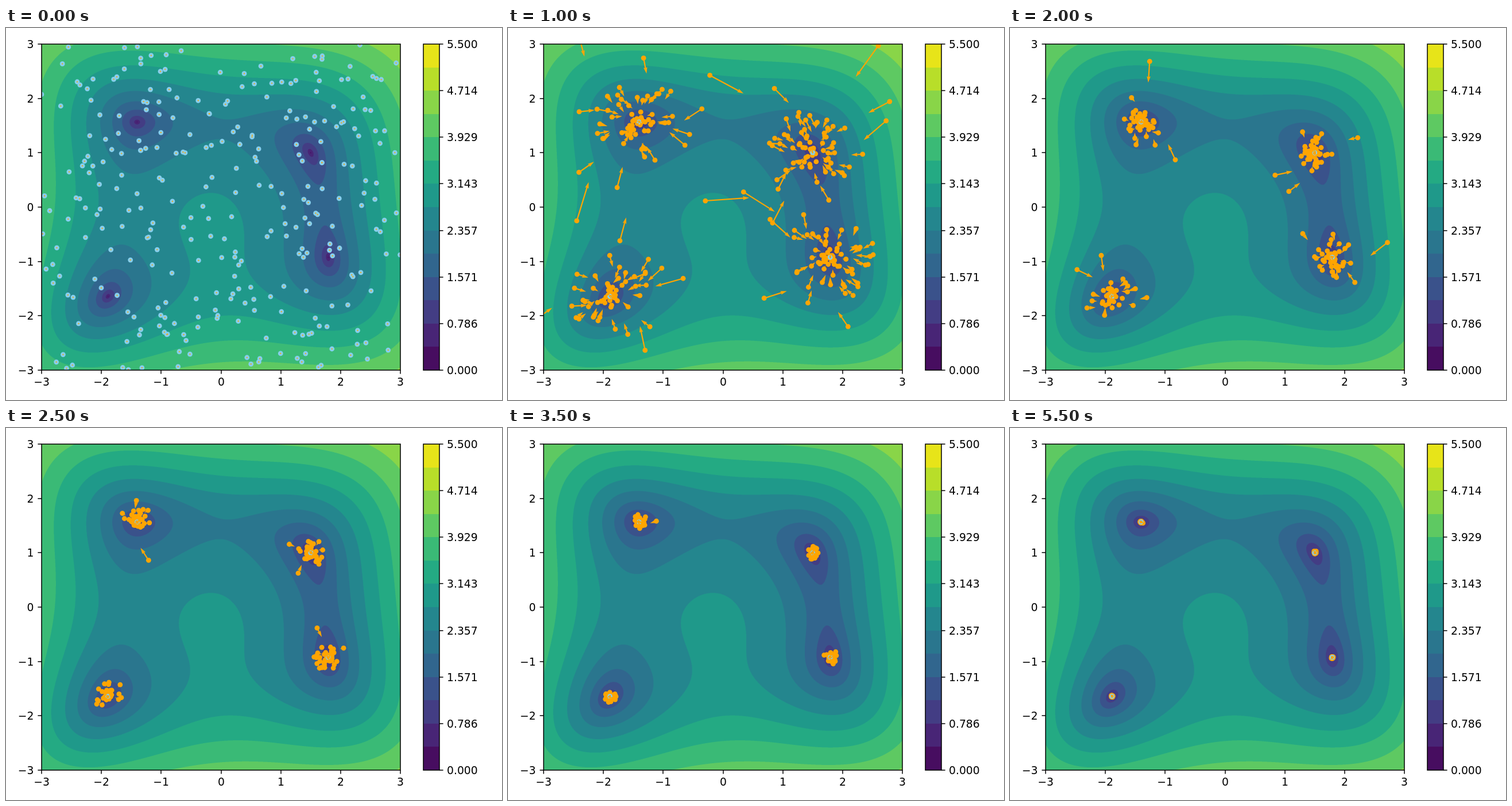
These frames come from a looping animation (864 px wide and 648 px high, 6 s). An HTML page with a canvas:

```html
<!DOCTYPE html>
<html lang="en">
<head>
<meta charset="utf-8">
<title>Particle swarm on a contour map</title>
<style>
  html, body { margin: 0; width: 100%; height: 100%; overflow: hidden; background: #fff; }
  canvas { display: block; width: 864px; height: 648px; }
</style>
</head>
<body>
<canvas id="stage" width="864" height="648"></canvas>
<script>
const ctx = document.getElementById('stage').getContext('2d');
const STEP = 500, STEPS = 12, COUNT = 300, LEVELS = 14, TOP = 5.5;
const LEFT = 62, RIGHT = 687, UPPER = 28, LOWER = 596;
const BAR_LEFT = 727, BAR_RIGHT = 755;
const X0 = 374.5, Y0 = 312, SX = 104.2, SY = 94.67;
const ORANGE = '#ffa500', SKY = '#87ceeb';
const BANDS = [
  '#470d60', '#482576', '#433d84', '#3a528b', '#31668e', '#2a768e', '#24868e',
  '#1f998a', '#24aa83', '#3aba76', '#5ec962', '#89d548', '#b8de29', '#e7e419'];

const px = x => X0 + SX * x;
const py = y => Y0 - SY * y;

// Fifth root of Himmelblau's function on doubled coordinates, at a pixel
function height(u, v) {
  const x = 2 * (u - X0) / SX, y = 2 * (Y0 - v) / SY;
  const a = x * x + y - 11, b = x + y * y - 7;
  return Math.pow(a * a + b * b, 0.2);
}

const homes = [[-1.403, 1.566], [1.5, 1], [1.792, -0.924], [-1.89, -1.642]]
  .map(([x, y]) => ({ x: px(x), y: py(y) }));

function random(seed) {
  return () => {
    seed = seed + 0x6D2B79F5 | 0;
    let t = Math.imul(seed ^ seed >>> 15, 1 | seed);
    t = t + Math.imul(t ^ t >>> 7, 61 | t) ^ t;
    return ((t ^ t >>> 14) >>> 0) / 4294967296;
  };
}

function paintField(c) {
  const w = RIGHT - LEFT, h = LOWER - UPPER, n = 3;
  const img = c.createImageData(w, h);
  const rgb = BANDS.map(s => [1, 3, 5].map(i => parseInt(s.slice(i, i + 2), 16)));
  for (let j = 0; j < h; j++) for (let i = 0; i < w; i++) {
    const sum = [0, 0, 0];
    for (let s = 0; s < n * n; s++) {
      const f = height(LEFT + i + (s % n + 0.5) / n, UPPER + j + (Math.floor(s / n) + 0.5) / n);
      const color = rgb[Math.min(LEVELS - 1, Math.floor(f / TOP * LEVELS))];
      for (let q = 0; q < 3; q++) sum[q] += color[q] / (n * n);
    }
    img.data.set([...sum, 255], (j * w + i) * 4);
  }
  c.putImageData(img, LEFT, UPPER);
}

function line(c, x1, y1, x2, y2) {
  c.beginPath();
  c.moveTo(x1, y1);
  c.lineTo(x2, y2);
  c.stroke();
}

function label(c, text, x, y, align) {
  c.textAlign = align;
  c.fillText(text, x, Math.round(y + 6.8));
}

function paintAxes(c) {
  const band = (LOWER - UPPER) / LEVELS;
  BANDS.forEach((color, i) => {
    const top = Math.round(LOWER - (i + 1) * band);
    c.fillStyle = color;
    c.fillRect(BAR_LEFT, top, BAR_RIGHT - BAR_LEFT, Math.round(LOWER - i * band) - top);
  });
  c.strokeStyle = c.fillStyle = '#000';
  c.lineWidth = 1.5;
  c.font = '18.75px "DejaVu Sans", sans-serif';
  for (let v = -3; v <= 3; v++) {
    const text = String(v).replace('-', '\u2212');
    const x = Math.round(px(v)), y = Math.round(py(v));
    line(c, x, LOWER, x, LOWER + 6.6);
    label(c, text, x, 616, 'center');
    line(c, LEFT, y, LEFT - 6.6, y);
    label(c, text, 48.4, y, 'right');
  }
  c.strokeRect(BAR_LEFT, UPPER, BAR_RIGHT - BAR_LEFT, LOWER - UPPER);
  for (let i = 0; i <= LEVELS; i += 2) {
    const y = Math.round(LOWER - i * band);
    line(c, BAR_RIGHT, y, BAR_RIGHT + 6.6, y);
    label(c, (i * TOP / LEVELS).toFixed(3), 768, y, 'left');
  }
}

function dot(x, y, r, color) {
  ctx.fillStyle = color;
  ctx.beginPath();
  ctx.arc(x, y, r, 0, 7);
  ctx.fill();
}

function arrow({ x, y, dx, dy }) {
  const len = Math.hypot(dx, dy);
  if (len < 2.2) return dot(x, y, 1.1, ORANGE);
  const k = Math.min(1, len / 11), w = 1.1 * k;
  ctx.save();
  ctx.translate(x, y);
  ctx.rotate(Math.atan2(dy, dx));
  ctx.fillStyle = ORANGE;
  ctx.beginPath();
  [[0, w], [len - 9.9 * k, w], [len - 11 * k, 3 * w], [len, 0],
   [len - 11 * k, -3 * w], [len - 9.9 * k, -w], [0, -w]].forEach(p => ctx.lineTo(...p));
  ctx.fill();
  ctx.restore();
}

const still = ({ x, y }) => ({ x, y, dx: 0, dy: 0, best: true });

const rnd = random(71);
const particles = Array.from({ length: COUNT }, () => {
  const x = px(rnd() * 6 - 3), y = py(rnd() * 6 - 3);
  const far = h => Math.hypot(h.x - x, h.y - y);
  const home = homes.reduce((a, b) => far(b) < far(a) ? b : a);
  return { x, y, home, rests: height(x, y) < 2.15 };
});

// One particle near its minimum: the cloud shrinks with each step, a few stray
function place(home, k, rnd) {
  const reach = 115 * Math.pow(0.68, k - 1);
  const stray = rnd() < 0.14 * Math.pow(0.75, k - 1);
  let x, y;
  do {
    const u = rnd(), a = rnd() * Math.PI * 2;
    const r = reach * (stray ? 1.1 + 2 * u * u : Math.pow(u, Math.min(5, 0.5 + k / 2)));
    x = home.x + r * Math.cos(a);
    y = home.y + r * Math.sin(a);
  } while (k === 1 && height(x, y) < 1.9);
  const pull = 0.2 + 0.2 * rnd(), sway = (rnd() - 0.5) * 0.8;
  const ex = (home.x - x) * pull, ey = (home.y - y) * pull;
  const c = Math.cos(sway), s = Math.sin(sway);
  return { x, y, dx: ex * c - ey * s, dy: ex * s + ey * c };
}

function swarm(k) {
  if (!k) return particles.map(still);
  const rnd = random(71 + k * 101);
  const moved = particles.map(p => k === 1 && p.rests ? still(p) : place(p.home, k, rnd));
  return k === 1 ? moved : [...moved, ...homes.map(still)];
}

const back = document.createElement('canvas');
back.width = 864;
back.height = 648;
const bc = back.getContext('2d');
bc.fillStyle = '#fff';
bc.fillRect(0, 0, 864, 648);
paintField(bc);
paintAxes(bc);

const swarms = Array.from({ length: STEPS }, (_, k) => swarm(k));

function draw(k) {
  ctx.drawImage(back, 0, 0);
  ctx.save();
  ctx.beginPath();
  ctx.rect(LEFT, UPPER, RIGHT - LEFT, LOWER - UPPER);
  ctx.clip();
  const all = swarms[k];
  all.filter(p => !p.best).forEach(p => dot(p.x, p.y, 4.4, ORANGE));
  all.filter(p => p.best).forEach(p => dot(p.x, p.y, 4.4, SKY));
  all.forEach(arrow);
  ctx.restore();
  ctx.strokeStyle = '#000';
  ctx.lineWidth = 1.5;
  ctx.strokeRect(LEFT, UPPER, RIGHT - LEFT, LOWER - UPPER);
}

let shown = -1;
const start = performance.now();
function tick(now) {
  const k = Math.floor(Math.max(0, now - start) / STEP) % STEPS;
  if (k !== shown) draw(shown = k);
  requestAnimationFrame(tick);
}
tick(start);
</script>
</body>
</html>
```
